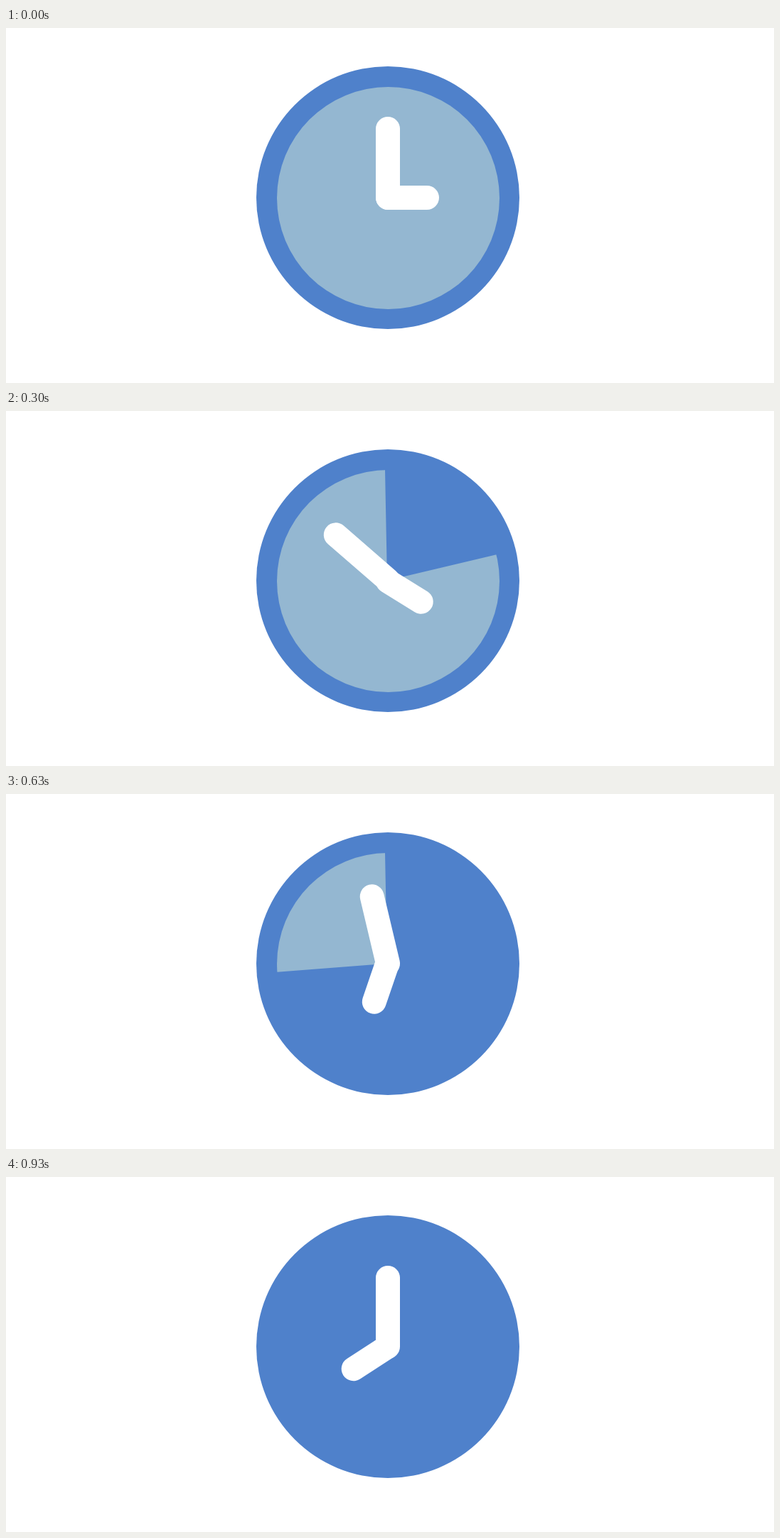
These frames come from a looping animation (1080x500 px, 0.96 s). An HTML page with a canvas:

```html
<!DOCTYPE html>
<html lang="en">
<head>
<meta charset="utf-8">
<title>Clock</title>
<style>
  html, body { margin: 0; width: 100%; height: 100%; overflow: hidden; background: #fff; }
  canvas { display: block; }
</style>
</head>
<body>
<canvas id="stage" width="1080" height="500"></canvas>
<script>
const ctx = document.getElementById('stage').getContext('2d');
const TAU = Math.PI * 2;
const LOOP = 960, STEP = 30, STEPS = 30;
const RIM = '#4f81cb', FACE = '#94b7d1', HAND = '#fff';
const start = performance.now();

const rad = deg => deg * Math.PI / 180;
const ease = p => p * p * (3 - 2 * p);

function disc(x, y, r, color) {
  ctx.fillStyle = color;
  ctx.beginPath();
  ctx.arc(x, y, r, 0, TAU);
  ctx.fill();
}

// Part of the face not yet swept, cut from a pivot slightly off centre.
function face(e) {
  if (e >= 1) return;
  if (e <= 0) return disc(537.5, 239.5, 156.5, FACE);
  const from = rad(-91.1);
  ctx.save();
  ctx.beginPath();
  ctx.moveTo(536, 238.7);
  ctx.arc(536, 238.7, 200, from + TAU * e, from + TAU);
  ctx.closePath();
  ctx.clip();
  disc(537.5, 239.5, 156.5, FACE);
  ctx.restore();
}

function hand(px, py, deg, tipX, tipY) {
  ctx.save();
  ctx.translate(px, py);
  ctx.rotate(rad(deg));
  ctx.translate(-px, -py);
  ctx.beginPath();
  ctx.moveTo(537, 239);
  ctx.lineTo(tipX, tipY);
  ctx.stroke();
  ctx.restore();
}

function draw(t) {
  // The first pose is held for two steps.
  const n = Math.max(0, Math.floor(t / STEP) - 1);
  const e = ease(n / STEPS);
  ctx.fillStyle = '#fff';
  ctx.fillRect(0, 0, 1080, 500);
  disc(537, 239, 185, RIM);
  face(e);
  ctx.strokeStyle = HAND;
  ctx.lineWidth = 34;
  ctx.lineCap = 'round';
  hand(535.7, 239.3, 147 * e, 592, 239);
  hand(535.9, 238.6, 1440 * e, 537, 142);
}

function tick() {
  draw((performance.now() - start) % LOOP);
  requestAnimationFrame(tick);
}
tick();
</script>
</body>
</html>
```
